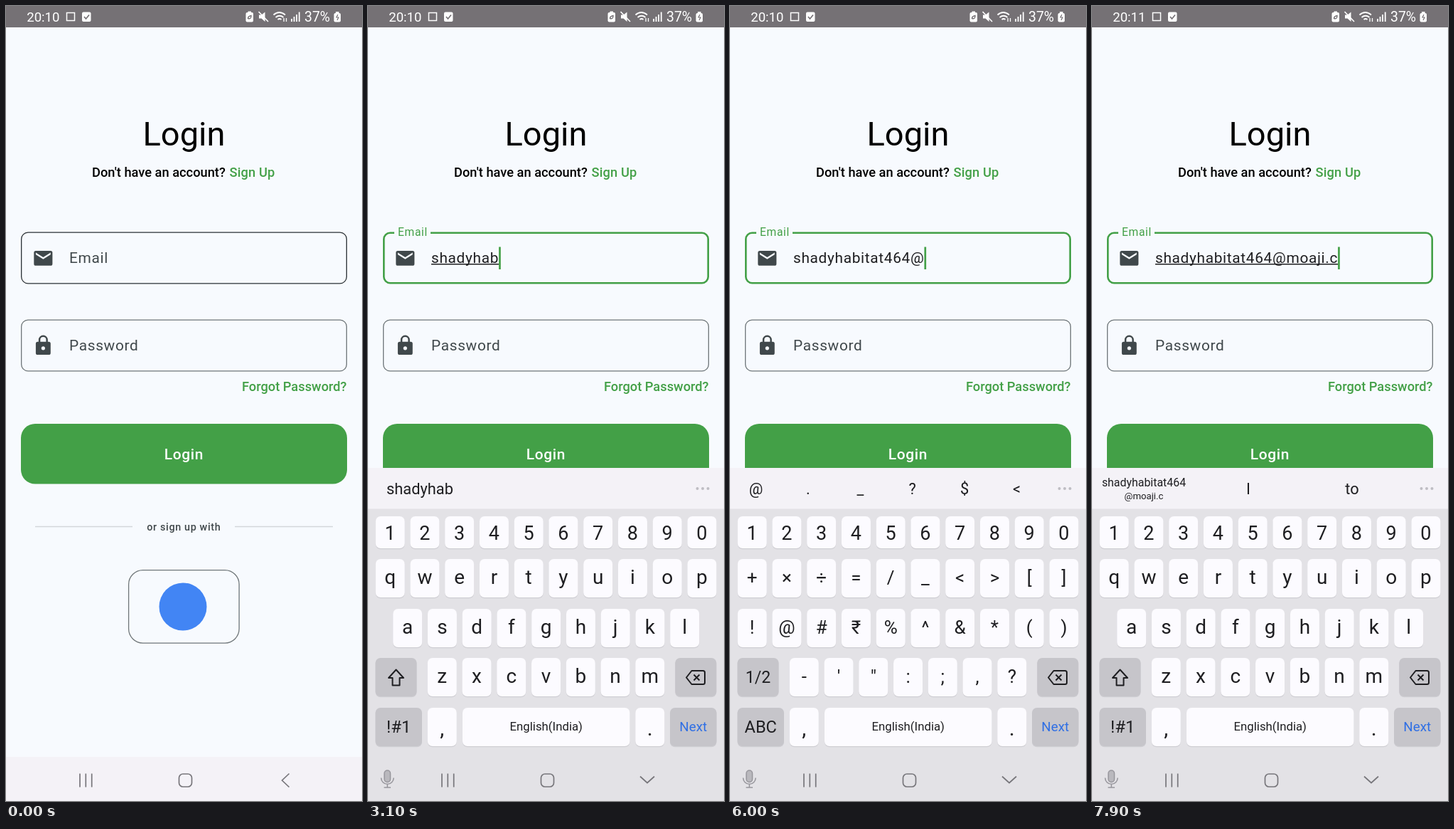
Recreate the animation shown at these times as an HTML page. Size 501 px wide and 1117 px high, loop 8000 ms.

```html
<!DOCTYPE html>
<html lang="en">
<head>
<meta charset="utf-8">
<title>Login</title>
<style>
  html, body { margin: 0; width: 100%; height: 100%; overflow: hidden; background: #f7fafe; }
  svg { display: block; font-family: Roboto, sans-serif; }
  text { white-space: pre; }
  .pop { filter: drop-shadow(0 2px 3px #0004); }
</style>
</head>
<body>
<svg id="stage" width="501" height="1117" viewBox="0 0 501 1117"></svg>
<script>
const LOOP = 8000, GREEN = '#43a047', INK = '#1e1e21', GREY = '#40484b', PAGE = '#f7fafe';
const KEY = '#fcfbff', FN = '#c6c5ca', DOWN = '#a4a3a8';
const NAME = 'shadyhabitat464', HOST = '@moaji.c';

function el(parent, tag, attrs = {}, content) {
  const node = document.createElementNS('http://www.w3.org/2000/svg', tag);
  set(node, attrs);
  if (content !== undefined) node.textContent = content;
  return parent.appendChild(node);
}
function set(node, attrs) {
  for (const name in attrs) node.setAttribute(name, attrs[name]);
}
const rect = (p, x, y, width, height, rx, fill, more) =>
  el(p, 'rect', { x, y, width, height, rx, fill, ...more });
const text = (p, x, y, size, fill, str, more) =>
  el(p, 'text', { x, y, 'font-size': size, fill, ...more }, str);
const line = (p, d, stroke, width, more) =>
  el(p, 'path', { d, stroke, 'stroke-width': width, fill: 'none', ...more });
const show = (node, on) => node.setAttribute('visibility', on ? 'inherit' : 'hidden');
const clamp = v => Math.max(0, Math.min(1, v));
const mix = (a, b, p) => a + (b - a) * p;

// An outline whose stroke stays inside the field's bounds.
const outline = (node, y, stroke, w) => set(node, { x: 21 + w / 2, y: y + w / 2,
  width: 459 - w, height: 73 - w, rx: 10 - w / 2, stroke, 'stroke-width': w });

const MID = { 'text-anchor': 'middle' }, MEDIUM = { 'font-weight': 500 };
const SPACED = { 'letter-spacing': .65 };
const stage = document.getElementById('stage');

// Page
rect(stage, 0, 0, 501, 1117, 0, PAGE);
text(stage, 250.5, 196, 47, '#000', 'Login', MID);
text(stage, 121, 240, 18.25, '#000', "Don't have an account?", MEDIUM);
text(stage, 314.5, 240, 18.25, GREEN, 'Sign Up', { ...MEDIUM, 'letter-spacing': .13 });
const emailBox = el(stage, 'rect', { fill: 'none' });
outline(el(stage, 'rect', { fill: 'none' }), 440.5, '#6f7679', 1.3);
const icon = (y, d) => el(stage, 'path', {
  d, fill: GREY, 'fill-rule': 'evenodd', transform: `translate(36.7 ${y}) scale(1.304)` });
icon(338.7, 'M20 4H4a2 2 0 0 0-2 2v12a2 2 0 0 0 2 2h16a2 2 0 0 0 2-2V6a2 2 0 0 0-2-2zm0 4l-8 5-8-5V6l8 5 8-5z');
icon(461.3, 'M18 8h-1V6A5 5 0 0 0 7 6v2H6a2 2 0 0 0-2 2v10a2 2 0 0 0 2 2h12a2 2 0 0 0 2-2V10a2 2 0 0 0-2-2zm-6 9a2 2 0 1 1 0-4 2 2 0 0 1 0 4zm3.1-9H8.9V6a3.1 3.1 0 0 1 6.2 0z');
const notch = rect(stage, 37, 315, 51, 7, 0, PAGE);
const label = text(stage, 89, 361, 20.9, GREY, 'Email', SPACED);
text(stage, 89, 484, 20.9, GREY, 'Password', SPACED);
const typed = text(stage, 89, 361, 20.9, INK, '', SPACED);
const underline = rect(stage, 89, 362, 0, 1.5, 0, INK);
const caret = rect(stage, 89, 338.5, 2.7, 31.5, 0, GREEN);
text(stage, 479.5, 541, 18.25, GREEN, 'Forgot Password?', { ...MEDIUM, 'text-anchor': 'end' });
rect(stage, 21, 587, 459, 84.5, 20, GREEN);
text(stage, 250.5, 636.5, 20.9, '#fff', 'Login', { ...MID, ...MEDIUM, ...SPACED });
line(stage, 'M41 731.5H178M322 731.5H460', '#d3d6da', 1.3);
text(stage, 250.3, 737, 14.35, GREY, 'or sign up with', { ...MID, ...MEDIUM, ...SPACED });
rect(stage, 172.6, 792.6, 155.5, 102.5, 20, 'none', { stroke: '#6f7679', 'stroke-width': 1.3 });
el(stage, 'circle', { cx: 249, cy: 844, r: 33.5, fill: '#4285f4' });

// Status bar
rect(stage, 0, 0, 501, 30, 0, '#757175');
const clock = text(stage, 29.2, 22, 18.6, '#fff', '');
line(stage, 'M85.5 9.5h11v11h-11z', '#fff', 1.5);
rect(stage, 107, 8.5, 12.5, 13.5, 2, '#fff');
line(stage, 'M110 15l2.500 3 4.500-5.500', '#757175', 1.7);
rect(stage, 337.5, 9, 10.5, 13.5, 2, '#fff');
rect(stage, 340.5, 7.5, 4.5, 3, 0, '#fff');
line(stage, 'M340.500 17.500q0-3 4.500-4q0 5.500-4.500 4z', '#757175', 1.4);
el(stage, 'path', { d: 'M356 12.500h3.500l5-4v13.500l-5-4.500H356z', fill: '#fff' });
line(stage, 'M355.500 8l13.500 14', '#fff', 1.6);
line(stage, 'M376.500 12.500q8-7 16.500 0M379.500 16q5.500-4.500 11 0M382.500 19q2.500-2 5 0', '#fff', 1.7);
line(stage, 'M391 17v5M394.500 17v5', '#fff', 1.3);
line(stage, 'M402 18v4M405.500 15v7M409 12v10M412.700 8.500v13.500', '#fff', 1.8);
text(stage, 420, 22, 19.4, '#fff', '37%');
rect(stage, 461.5, 10, 9.5, 12.5, 2, '#fff');
rect(stage, 464, 8, 4.5, 3, 0, '#fff');
line(stage, 'M467 12l-2 4h3l-2 4', '#757175', 1.2);

// Keyboard
rect(stage, 0, 1055, 501, 62, 0, '#f4f2f7');
const board = el(stage, 'g');
rect(board, 0, 649, 501, 468, 0, '#e3e2e6');
rect(board, 0, 649, 501, 57.5, 0, '#f4f2f7');
const clip = el(board, 'clipPath', { id: 'strip' });
rect(clip, 0, 649, 147, 58);
const hintLayer = el(board, 'g');
const dots = el(board, 'g');
for (const cx of [463.5, 471, 478.5]) el(dots, 'circle', { cx, cy: 678, r: 2 });

const common = el(board, 'g'), letters = el(board, 'g'), symbols = el(board, 'g');
const keys = {};
function key(parent, ch, x, y, w, h, size, options = {}) {
  const { fill = KEY, color = INK, drop = 35, name = ch, popup = true } = options;
  rect(parent, x, y + 1.3, w, h, 7, '#cfced3');
  const face = rect(parent, x, y, w, h, 7, fill);
  text(parent, x + w / 2, y + drop, size, color, ch, MID);
  keys[name] = { face, fill, x: x + w / 2, y, ch, popup };
}
function row(parent, chars, x, y, h = 54, size = 28, drop = 35) {
  [...chars].forEach((ch, i) => key(parent, ch, x + i * 48.75, y, 41, h, size, { drop }));
}
const fn = (parent, ch, x, y, w, size, name) =>
  key(parent, ch, x, y, w, 54, size, { fill: FN, name: name || ch, popup: false });

row(common, '1234567890', 10.7, 717, 45, 27, 33);
row(letters, 'qwertyuiop', 10.7, 777);
row(letters, 'asdfghjkl', 35.2, 847);
row(letters, 'zxcvbnm', 83.8, 916);
row(symbols, '+×÷=/_<>[]', 10.7, 777, 54, 26);
row(symbols, '!@#₹%^&*()', 10.7, 847, 54, 26);
row(symbols, '-\'":;,?', 83.8, 916, 54, 26);
fn(letters, '', 10.5, 916, 58, 22, 'shift');
line(letters, 'M39.500 932.500l10.500 11.500h-5.500v10.500h-10v-10.500h-5.500z', INK, 2, { 'stroke-linejoin': 'round' });
fn(symbols, '1/2', 10.5, 916, 58, 23);
fn(common, '', 432.3, 916, 58, 22, 'back');
line(common, 'M455.500 934h16q2.500 0 2.500 2.500v14q0 2.500-2.500 2.500h-16l-7.500-9.500zM458.500 939.500l8 8M466.500 939.500l-8 8', INK, 2, { 'stroke-linejoin': 'round' });
fn(letters, '!#1', 10.5, 986, 65.5, 24);
fn(symbols, 'ABC', 10.5, 986, 65.5, 23.5);
key(common, ',', 83.8, 986, 41, 54, 30, { drop: 39, name: 'comma' });
key(common, 'English(India)', 133, 986, 235.5, 54, 16.8, { drop: 32 });
key(common, '.', 376.3, 986, 41, 54, 30, { drop: 39, popup: false });
key(common, 'Next', 425, 986, 65.5, 54, 18.8, { fill: FN, color: '#2f6fe4', drop: 33 });

const popup = el(board, 'g', { class: 'pop' });
rect(popup, -37.5, -107, 75, 97, 11, KEY);
const popupText = text(popup, 0, -41.5, 43, INK, '', MID);

// Navigation
const NAV = '#77767b', MIC = '#98979d';
line(stage, 'M104 1078.500v19M112.300 1078.500v19M120.700 1078.500v19', NAV, 1.7);
rect(stage, 243.5, 1079, 18, 18, 5.5, 'none', { stroke: NAV, 'stroke-width': 1.7 });
const back = line(stage, 'M398.500 1078.500l-10 9.500 10 9.500', NAV, 1.7);
const hide = line(stage, 'M383 1082.500l10 9 10-9', NAV, 1.7);
const mic = el(stage, 'g');
rect(mic, 23, 1074, 8.5, 16.5, 4.2, '#b9b8bd', { stroke: MIC, 'stroke-width': 1.5 });
line(mic, 'M18.500 1084.500a8.800 8.800 0 0 0 17.600 0M27.300 1093.500v4M22.500 1098h9.500', MIC, 1.6);

// Key presses: [time, key]; a character is committed 100 ms after its press.
const taps = [];
const tap = (chars, ...times) => times.forEach((t, i) => taps.push([t, chars[i]]));
tap(NAME, 1800, 2000, 2300, 2400, 2500, 2700, 2800, 2900, 3800, 4000, 4200, 4400, 4700, 4900, 5000);
tap(['!#1'], 5300);
tap('@', 5800);
tap(['ABC'], 6300);
tap(HOST.slice(1), 6700, 6800, 7000, 7200, 7300, 7400, 7600);

// Suggestions: [from, to, centre, word, second line, colour]
const hints = [
  [1600, 2500, 73, 'hi'], [1600, 2500, 220, 'abc', '', '#3a78e0'], [1600, 2500, 366, 'est'],
  [2500, 2800, 73, 'sha'], [2500, 2800, 220, 'shall'], [2500, 2800, 366, 'shape'],
  [2800, 3100, 73, 'shady'], [2800, 3100, 220, 'shade'], [2800, 3100, 366, 'shadow'],
  [3100, 4200, 73, 'shadyhab'], [4020, 4400, 220, 'Shadyh'], [3980, 4400, 366, 'Shadyha'],
  [4200, 4600, 73, 'shadyhabit'], [4600, 5100, 73, 'shadyhabitat'], [5100, 5400, 73, NAME],
  ...[...'@._?$<'].map((ch, i) => [5400, 6400, 36.5 + i * 73.4, ch]),
  [6400, 6880, 220, 'I'], [6400, 6880, 366, 'to'],
  [6800, 7700, 73, NAME, HOST + 'om'], [7700, LOOP, 73, NAME, HOST],
  [6880, 7600, 220, 'orvelin.com'], [6980, 7600, 366, 'zunto.com'],
  [7600, LOOP, 220, 'I'], [7550, LOOP, 366, 'to']
];

function drawHints(t) {
  hintLayer.textContent = '';
  for (const [from, to, x, word, second, color = INK] of hints) {
    if (t < from || t >= to) continue;
    const size = second ? 15.9 : word.length > 12 ? 18.9 : 21.8;
    const long = word.length > 12 && !second;
    const node = text(hintLayer, long ? 6 : x, second ? 675 : 686, size, color, '',
      long ? { 'clip-path': 'url(#strip)' } : MID);
    [...word].forEach((ch, i) => el(node, 'tspan', {
      'fill-opacity': x === 73 ? 1 : clamp((t - from - i * 50) / 200) }, ch));
    if (second) text(hintLayer, x, 693, 13.2, INK, second, MID);
  }
}

function draw(t) {
  const active = t >= 1300;
  const float = active ? clamp((t - 1250) / 200) : 0;
  const open = active ? 1 - (1 - clamp((t - 1300) / 400)) ** 3 : 0;

  clock.textContent = t < 7300 ? '20:10' : '20:11';
  outline(emailBox, 317.5, active ? GREEN : '#2a3034', active ? 2.6 : 1.3);
  set(label, { x: mix(89, 42, float), y: mix(361, 323, float),
    'font-size': mix(20.9, 15.65, float), fill: active ? GREEN : GREY });
  show(notch, float > .5);

  const value = taps.filter(([at, k]) => k.length === 1 && t >= at + 100).map(p => p[1]).join('');
  typed.textContent = value;
  const width = value ? typed.getComputedTextLength() : 0;
  set(underline, { width });
  show(underline, value && !value.endsWith('@'));
  set(caret, { x: 89 + width });
  show(caret, active);

  set(board, { transform: `translate(0 ${468 * (1 - open)})` });
  show(board, active);
  show(back, open < .5);
  show(hide, open >= .5);
  show(mic, open >= .5);
  set(dots, { fill: t < 2500 ? INK : '#bebdc3' });
  const symbolic = t >= 5400 && t < 6400;
  show(letters, !symbolic);
  show(symbols, symbolic);

  for (const name in keys) set(keys[name].face, { fill: keys[name].fill });
  show(popup, false);
  for (const [at, name] of taps) {
    if (t < at || t >= at + 200) continue;
    const k = keys[name];
    if (t < at + 100) set(k.face, { fill: DOWN });
    if (!k.popup) continue;
    show(popup, true);
    set(popup, { transform: `translate(${k.x} ${k.y})` });
    popupText.textContent = k.ch;
  }
  drawHints(t);
}

const start = performance.now();
function frame() {
  draw((performance.now() - start) % LOOP);
  requestAnimationFrame(frame);
}
frame();
</script>
</body>
</html>
```
